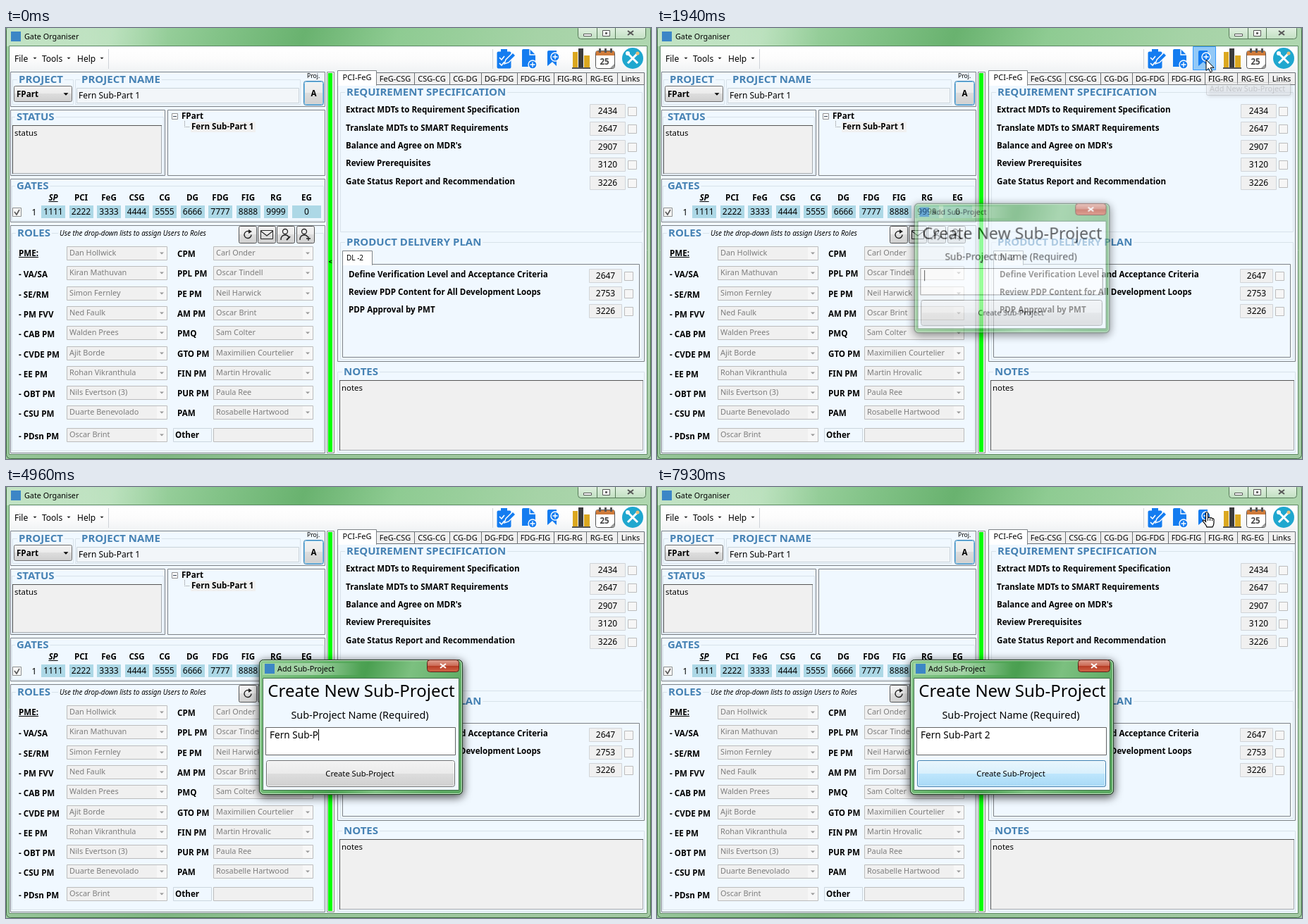
Recreate the animation shown at these times as an HTML page with a canvas. Size 915 px wide and 612 px high, loop 8 s.

```html
<!DOCTYPE html>
<html lang="en">
<head>
<meta charset="utf-8">
<title>Gate Organiser</title>
<style>
html, body { margin: 0; width: 100%; height: 100%; overflow: hidden; }
canvas { display: block; }
</style>
</head>
<body>
<canvas id="stage" width="915" height="612"></canvas>
<script>
const LOOP = 8000;
const stage = document.getElementById('stage').getContext('2d');
const dialogLayer = Object.assign(document.createElement('canvas'), { width: 915, height: 612 });
const dialogCtx = dialogLayer.getContext('2d');
let c = stage; // context currently drawn to

const BLUE = '#4682b4', ALICE = '#f0f8ff', FACE = '#f0f0f0', ICON = '#147cf0';
const clamp = v => Math.max(0, Math.min(1, v));
const ramp = (t, from, to) => clamp((t - from) / (to - from));

// ---- drawing helpers ----
function text(str, x, y, { size = 12, bold, italic, color = '#000', align = 'left', line } = {}) {
  c.font = `${italic ? 'italic ' : ''}${bold ? 'bold ' : ''}${size}px "Noto Sans", sans-serif`;
  c.fillStyle = color;
  c.textAlign = align;
  c.fillText(str, x, y + size * 0.36);
  const width = c.measureText(str).width;
  if (line) c.fillRect(align === 'center' ? x - width / 2 : x, Math.round(y + size * 0.36) + 1, width, 1);
  return width;
}
const label = (str, x, y, opts) => text(str, x, y, { size: 11.6, bold: true, ...opts });

function box(x0, y0, x1, y1, fill, stroke, r = 0) {
  c.beginPath();
  c.roundRect(x0 + 0.5, y0 + 0.5, x1 - x0 - 1, y1 - y0 - 1, r);
  if (fill) { c.fillStyle = fill; c.fill(); }
  if (stroke) { c.strokeStyle = stroke; c.lineWidth = 1; c.stroke(); }
}
function rect(x, y, w, h, fill) { c.fillStyle = fill; c.fillRect(x, y, w, h); }
function shape(d, fill, stroke, width = 1) {
  const p = new Path2D(d);
  if (fill) { c.fillStyle = fill; c.fill(p); }
  if (stroke) { c.strokeStyle = stroke; c.lineWidth = width; c.stroke(p); }
}
function disc(x, y, r, fill, stroke, width = 1) {
  shape(`M${x - r} ${y}a${r} ${r} 0 1 0 ${2 * r} 0a${r} ${r} 0 1 0 ${-2 * r} 0z`, fill, stroke, width);
}
function gradient(x0, y0, x1, y1, ...stops) {
  const g = c.createLinearGradient(x0, y0, x1, y1);
  stops.forEach((s, i) => g.addColorStop(...(Array.isArray(s) ? s : [i / (stops.length - 1), s])));
  return g;
}
const glossy = (y0, y1, a, b, d, e) => gradient(0, y0, 0, y1, [0, a], [0.49, b], [0.5, d], [1, e]);
const plainButton = (y0, y1) => glossy(y0, y1, '#f3f3f3', '#ebebeb', '#dddddd', '#cfcfcf');
const arrow = (x, y, color, w = 3) => shape(`M${x - w} ${y - w / 2}h${2 * w}l${-w} ${w}z`, color);
function faded(alpha, draw) {
  if (alpha <= 0) return;
  c.save();
  c.globalAlpha *= alpha;
  draw();
  c.restore();
}
function group(title, x, y, x0, x1, bottom) {
  box(x0, y, x1, bottom, null, '#d8e2ea');
  c.font = 'bold 15px "Noto Sans", sans-serif';
  rect(x - 2, y - 6, c.measureText(title).width + 4, 12, ALICE);
  text(title, x, y, { size: 15, bold: true, color: BLUE });
}
function checkbox(x, y, checked) {
  box(x, y, x + 13, y + 13, '#f6f6f6', checked ? '#8e8f8f' : '#bcbcbc');
  if (checked) shape(`M${x + 3} ${y + 6}l3 4l4 -7`, null, '#555', 1.6);
}
const cross = (x, y, color) => shape(`M${x - 4} ${y - 3}l8 6m0 -6l-8 6`, null, color, 2);

// ---- window frame ----
function frame(active) {
  rect(0, 0, 915, 612, gradient(0, 0, 915, 300, [0, '#8fcb94'], [0.15, '#a9d9ac'], [0.3, '#83c388'],
    [0.42, '#69b26f'], [0.55, '#8ecb92'], [0.75, '#a6d3a7'], [1, '#b4d8b4']));
  faded(0.55, () => rect(0, 26, 915, 586, gradient(0, 26, 0, 612, '#a9d5aa', '#c3dfc2', '#93bd94')));
  faded(active, () => {
    rect(0, 0, 915, 612, gradient(0, 0, 915, 300, [0, '#54bd50'], [0.2, '#3fae3b'], [0.45, '#2a9c28'],
      [0.7, '#31a32e'], [1, '#228c22']));
    faded(0.5, () => rect(0, 60, 6, 100, gradient(0, 60, 0, 160, '#8fda8c', '#c2ecc0', '#3fae3b')));
  });
  faded(0.45, () => rect(0, 0, 230, 26, gradient(0, 0, 230, 0, '#fff', '#ffffffb0', '#fff0')));
  box(0, -4, 915, 612, null, '#3d6b40', 6);
  rect(7, 5, 14, 14, '#3c86c6');
  text('Gate Organiser', 26, 12, { size: 10.8 });

  box(811, -4, 908, 16, gradient(0, 0, 0, 16, '#ffffffa0', '#ffffff40'), '#567a58', 4);
  faded(active, () => box(864, -4, 908, 16, glossy(0, 16, '#e0a598', '#cf6a55', '#b93a22', '#d4664a'), '#5a2018', 4));
  rect(838, 0, 1, 15, '#567a58');
  rect(864, 0, 1, 15, '#567a58');
  box(819, 8, 831, 12, '#fff', '#555');
  box(846, 3, 857, 12, '#fff', '#555');
  rect(850, 6, 3, 3, '#666');
  cross(886, 7, active > 0.5 ? '#fff' : '#555');

  box(4, 25, 910, 606, ALICE, '#5f8a61');
}

// ---- toolbar ----
function toolbar(hover) {
  rect(6, 27, 902, 34, gradient(0, 27, 0, 61, '#ffffff', '#fcfcfc', '#f1f3f5'));
  [['File', 12, 41], ['Tools', 51, 89], ['Help', 101, 136]].forEach(([s, x, ax]) => {
    text(s, x, 44);
    arrow(ax, 43, '#222', 2.5);
  });
  rect(145, 30, 1, 28, '#cfd3d8');
  rect(690, 30, 1, 28, '#cfd3d8');
  if (hover) box(760, 26, 793, 60, '#93c9f7', '#3399ff');

  // edit
  box(696, 33, 717, 58, ICON, null, 2);
  rect(702, 30, 9, 5, ICON);
  shape('M700 42l3 3l4 -5M700 50l3 3l4 -5', null, '#fff', 1.6);
  shape('M707 51l2 -6l10 -10l4 4l-10 10z', ICON, '#fff', 1.4);
  // new document
  shape('M732 32q0 -2 2 -2h9l8 8v17h-19z', ICON);
  shape('M743 30v8h8', null, '#fff', 1.3);
  disc(747, 52, 6, ICON, '#fff', 1.4);
  shape('M743.5 52h7M747 48.5v7', null, '#fff', 1.4);
  // bookmark
  shape('M768 34q0 -2 2 -2h11v22l-6 -6l-7 6z', ICON);
  disc(779, 41, 6, ICON, '#fff', 1.4);
  shape('M775.5 41h7M779 37.5v7', null, '#fff', 1.4);
  // chart
  rect(804, 34, 7, 23, '#dba820');
  rect(812, 29, 7, 28, '#3c3c3c');
  rect(820, 39, 8, 18, '#dba820');
  rect(803, 56, 26, 2, '#555');
  // calendar
  box(836, 32, 864, 58, '#fff', '#555', 3);
  rect(837, 33, 26, 6, '#cf7b3a');
  [842, 850, 858].forEach(x => rect(x - 1, 29, 3, 6, '#555'));
  text('25', 849, 48, { size: 11.5, bold: true, align: 'center', color: '#444' });
  shape('M857 57l6 -6v6z', '#999');
  // tools
  disc(889, 43, 15, '#1fa7cf');
  shape('M882 36l14 14M896 36l-14 14', null, '#fff', 3);
  disc(882, 36, 3, '#fff');
  disc(896, 36, 2.5, '#e8c07a');
}

// ---- left side ----
const STAFF = [
  ['PME:', 'Dan Hollwick', 'CPM', 'Carl Onder'],
  ['- VA/SA', 'Kiran Mathuvan', 'PPL PM', 'Oscar Tindell'],
  ['- SE/RM', 'Simon Fernley', 'PE PM', 'Neil Harwick'],
  ['- PM FVV', 'Ned Faulk', 'AM PM', 'Oscar Brint'],
  ['- CAB PM', 'Walden Prees', 'PMQ', 'Sam Colter'],
  ['- CVDE PM', 'Ajit Borde', 'GTO PM', 'Maximilien Courtelier'],
  ['- EE PM', 'Rohan Vikranthula', 'FIN PM', 'Martin Hrovalic'],
  ['- OBT PM', 'Nils Evertson (3)', 'PUR PM', 'Paula Ree'],
  ['- CSU PM', 'Duarte Benevolado', 'PAM', 'Rosabelle Hartwood'],
  ['- PDsn PM', 'Oscar Brint', 'Other', null],
];
const GATES = ['SP', 'PCI', 'FeG', 'CSG', 'CG', 'DG', 'FDG', 'FIG', 'RG', 'EG'];

function combo(x0, x1, y, value) {
  box(x0, y - 10, x1, y + 10, FACE, '#bcbcbc');
  if (value === null) return;
  text(value, x0 + 4, y - 0.5, { size: 10.9, color: '#7c7c7c' });
  rect(x1 - 15, y - 9, 14, 18, '#f7f7f7');
  arrow(x1 - 8, y, '#9a9a9a');
}

function leftSide(refreshed, active) {
  const panel = (y0, y1, x0 = 6, x1 = 453) => box(x0, y0, x1, y1, ALICE, '#7d8286');
  panel(62, 112);
  group('PROJECT', 18, 73, 9, 96, 109);
  group('PROJECT NAME', 107, 73, 98, 418, 109);
  box(11, 82, 94, 105, plainButton(82, 105), '#707070', 2);
  label('FPart', 15, 94);
  arrow(85, 94, '#000', 3.5);
  box(100, 85, 416, 107, '#f2f6f9', '#c9d3da');
  text('Fern Sub-Part 1', 103, 96);
  text('Proj.', 427, 68, { size: 8.6 });
  box(422, 75, 451, 110, plainButton(75, 110), active > 0.5 ? '#1f5f93' : '#3c7fb1', 3);
  box(423, 76, 450, 109, null, '#7cc4ec', 2);
  label('A', 436.5, 93, { align: 'center' });

  panel(116, 210, 6, 226);
  group('STATUS', 15, 126, 8, 224, 209);
  box(9, 138, 221, 207, FACE, '#a5a9ad');
  rect(9, 138, 212, 1, '#555');
  rect(9, 138, 1, 69, '#555');
  text('status', 12, 149, { size: 11.4 });

  panel(116, 210, 229, 453);
  if (!refreshed) {
    box(235, 121, 244, 130, '#fff', '#919191');
    rect(237, 125, 5, 1, '#345');
    label('FPart', 249, 125);
    c.setLineDash([1, 1]);
    shape('M253.5 132v8.500h7', null, '#888');
    c.setLineDash([]);
    rect(262, 133, 92, 15, FACE);
    label('Fern Sub-Part 1', 263, 140);
  }

  panel(214, 276);
  group('GATES', 15, 224, 8, 451, 274);
  checkbox(9, 255, true);
  text('1', 40, 262, { align: 'center' });
  GATES.forEach((name, i) => {
    const x = i < 9 ? 67 + i * 39.5 : 426.5, half = i < 9 ? 17 : 20.5;
    label(name, x, 241, { align: 'center', italic: !i, line: !i });
    rect(Math.round(x - half), 252, half * 2, 18, '#add8e6');
    text(i < 9 ? String(i + 1).repeat(4) : '0', x, 261, { align: 'center' });
  });

  panel(280, 604);
  group('ROLES', 16, 291, 8, 451, 601);
  rect(74, 284, 380 - 4 - 74, 14, ALICE);
  text('Use the drop-down lists to assign Users to Roles', 76, 291, { size: 9.9, italic: true });
  [330, 357, 384, 412].forEach(x => box(x, 281, x + 26, 306, plainButton(281, 306), '#555', 2));
  shape('M346 289.500a5 5 0 1 0 2 4', null, '#222', 1.4);
  shape('M344 286l5 3l-5 3z', '#222');
  box(361, 287, 379, 300, null, '#222');
  shape('M361 288l9 7l9 -7', null, '#222', 1.2);
  [396, 423].forEach(x => {
    disc(x, 289, 3.5, null, '#222', 1.3);
    shape(`M${x - 6} 301q0 -7 6 -7q4 0 5 3`, null, '#222', 1.3);
  });
  shape('M398 301l5 -5', null, '#222', 2);
  shape('M426 299h6m-3 -3v6', null, '#222', 1.3);

  STAFF.forEach(([roleA, nameA, roleB, nameB], i) => {
    const y = i < 9 ? Math.round(320 + i * 28.3) : 578;
    if (nameB === null) box(237, y - 10, 292, y + 10, ALICE, '#ccd6de');
    label(roleA, 18, i ? y + 2 : y, { line: !i });
    label(roleB, nameB === null ? 240 : 243, nameB === null ? y : y + 1);
    combo(86, 229, y, nameA);
    combo(294, 436, y, refreshed && roleB === 'AM PM' ? 'Tim Dorsal' : nameB);
  });

  rect(455, 62, 12, 542, '#f4f4f4');
  box(455, 62, 466, 604, '#e9efe9', '#8a8f8a');
  rect(457, 64, 6, 538, '#00ff00');
  text('<', 460, 332, { size: 9, bold: true, align: 'center' });
}

// ---- right side ----
function tasks(names, values, x, y0, boxX, boxW) {
  names.forEach((name, i) => {
    const y = y0 + i * 25.4, mid = Math.round(y + 2);
    label(name, x, y);
    box(boxX, mid - 10, boxX + boxW, mid + 10, FACE, '#d0d4d8');
    text(values[i], boxX + boxW / 2, mid, { align: 'center' });
    checkbox(boxX + boxW + 3, mid - 6);
  });
}

function rightSide() {
  box(470, 80, 906, 474, ALICE, '#7d8286');
  const edges = [525, 579, 629, 674, 725, 777, 823, 867, 905];
  ['FeG-CSG', 'CSG-CG', 'CG-DG', 'DG-FDG', 'FDG-FIG', 'FIG-RG', 'RG-EG', 'Links'].forEach((name, i) => {
    box(edges[i], 63, edges[i + 1] + 1, 81, FACE, '#6b6f73');
    text(name, (edges[i] + edges[i + 1]) / 2, 72, { size: 11, align: 'center' });
  });
  box(470, 60, 526, 82, '#fff', '#7d8286');
  rect(471, 80, 54, 2, '#fff');
  text('PCI-FeG', 498, 70, { size: 11, align: 'center' });

  group('REQUIREMENT SPECIFICATION', 483, 91, 474, 903, 290);
  tasks(['Extract MDTs to Requirement Specification', 'Translate MDTs to SMART Requirements',
    'Balance and Agree on MDR\'s', 'Review Prerequisites', 'Gate Status Report and Recommendation'],
    [2434, 2647, 2907, 3120, 3226], 482, 116, 828, 51);

  group('PRODUCT DELIVERY PLAN', 483, 304, 474, 903, 471);
  box(477, 335, 899, 468, ALICE, '#7d8286');
  box(477, 316, 520, 337, '#fff', '#7d8286');
  rect(478, 335, 41, 2, '#fff');
  text('DL -2', 483, 326, { size: 10 });
  tasks(['Define Verification Level and Acceptance Criteria', 'Review PDP Content for All Development Loops',
    'PDP Approval by PMT'], [2647, 2753, 3226], 486, 349.5, 827, 47);

  group('NOTES', 479, 488, 470, 906, 603);
  box(473, 500, 904, 600, FACE, '#a5a9ad');
  rect(473, 500, 431, 1, '#555');
  rect(473, 500, 1, 100, '#555');
  text('notes', 476, 511, { size: 11.4 });
}

// ---- dialog ----
const TYPED = 'Fern Sub-Part 2';
const KEY_TIMES = [3250, 3330, 3400, 3480, 3710, 4170, 4320, 4490, 4640, 4960, 5580, 5660, 5740, 5890, 6060];
const caretOn = t => t < 2470 || (t >= 2870 && t < 5500) || (t >= 5580 && t < 6520);

function dialog(t) {
  c.clearRect(0, 0, 915, 612);
  c.save();
  c.shadowColor = 'rgba(0,0,0,.75)';
  c.shadowBlur = 13;
  c.shadowOffsetY = 3;
  box(359, 245, 648, 437, '#69b36d', '#1e3a20', 6);
  c.restore();
  box(359, 245, 648, 437, gradient(359, 245, 648, 330, [0, '#8ecb91'], [0.3, '#5fb064'], [0.5, '#4a9f50'],
    [0.7, '#7cc080'], [1, '#5aa860']), '#1e3a20', 6);
  box(360, 246, 647, 436, null, '#c4e6c5', 5);
  faded(0.4, () => rect(364, 250, 140, 17, gradient(364, 0, 504, 0, '#fff8', '#fff', '#fff0')));
  rect(367, 251, 14, 14, '#3c86c6');
  text('Add Sub-Project', 385, 258, { size: 10.8 });
  box(597, 245, 643, 263, glossy(245, 263, '#dfa394', '#cc6a55', '#b53a22', '#d4694c'), '#5a2018', 4);
  cross(620, 254, '#fff');
  box(364, 271, 643, 431, ALICE, '#41704a');
  text('Create New Sub-Project', 504, 289, { size: 24, align: 'center' });
  text('Sub-Project Name (Required)', 502, 324, { size: 14.4, align: 'center' });

  box(368, 341, 638, 381, '#fff', '#646464');
  const width = text(TYPED.slice(0, KEY_TIMES.filter(k => k <= t).length), 374, 352, { size: 13.6 });
  if (caretOn(t)) rect(Math.round(374 + width), 344, 1, 16, '#000');

  box(369, 388, 637, 426, plainButton(388, 426), '#707070', 3);
  const hover = Math.max(ramp(t, 6680, 6900), 0.5 * clamp(1 - Math.abs(t - 2570) / 130));
  faded(hover, () => box(369, 388, 637, 426, glossy(388, 426, '#eaf6fd', '#d9f0fc', '#bee6fd', '#a7d9f5'), '#3c7fb1', 3));
  if (t >= 6980 && t < 7150)
    box(369, 388, 637, 426, glossy(388, 426, '#dceefa', '#bfe0f4', '#9bcfee', '#74b8e0'), '#2c628b', 3);
  else box(370, 389, 636, 425, null, '#ffffffa0', 2);
  text('Create Sub-Project', 502, 407, { size: 11.2, align: 'center' });
}

function showDialog(t) {
  const p = ramp(t, 1790, 2040);
  if (!p) return;
  c = dialogCtx;
  dialog(t);
  c = stage;
  faded(p, () => {
    const s = 0.9 + 0.1 * p;
    c.translate(503.5, 340);
    c.scale(s, s);
    c.drawImage(dialogLayer, -503.5, -340);
  });
}

// ---- pointer ----
const POINTER_PATH = [[380, 915, 130], [600, 850, 90], [910, 779, 45], [2060, 779, 45], [2470, 540, 421],
  [2560, 500, 398], [2700, 462, 357], [6520, 462, 357], [6900, 440, 414], [7370, 440, 414],
  [7600, 640, 240], [7850, 790, 60], [7930, 780, 36], [LOOP, 780, 36]];

function pointerAt(t) {
  const i = POINTER_PATH.findIndex(p => p[0] > t);
  const [t0, x0, y0] = POINTER_PATH[i - 1], [t1, x1, y1] = POINTER_PATH[i];
  const k = ramp(t, t0, t1);
  return [x0 + (x1 - x0) * k, y0 + (y1 - y0) * k];
}

function pointer(t) {
  if (t < 380 || (t >= 3250 && t < 6520)) return;
  const [x, y] = pointerAt(t).map(Math.round);
  const inDialog = t > 2100 && x > 365 && x < 640;
  c.save();
  c.translate(x, y);
  if (inDialog && y > 341 && y < 381) {
    shape('M-3 -6.500h2.500l.5 1l.5 -1h2.500M-3 6.500h2.500l.5 -1l.5 1h2.500M0 -6v12', null, '#000', 1.2);
  } else if (t >= 6520 || (inDialog && y >= 388 && y <= 426)) {
    shape('M-1.500 1.500q0 -2 1.500 -2t1.500 2v6q2 -1 3 .5q2 -.8 3 .8q2.500 -.5 2.500 2v4q0 3 -2 6h-8' +
      'q-1 -3 -5.500 -8q-.5 -2.500 2 -1.500l2 2z', '#fff', '#000', 1.2);
    shape('M1.500 8v4M4.500 9v3M7.500 10v2', null, '#000');
  } else {
    shape('M0 0v15.500l3.500 -3.300l2.500 5.600l2.600 -1.200l-2.500 -5.300h4.900z', '#fff', '#000');
  }
  c.restore();
}

function tooltip(alpha) {
  faded(alpha, () => {
    c.save();
    c.shadowColor = 'rgba(0,0,0,.5)';
    c.shadowBlur = 4;
    c.shadowOffsetX = c.shadowOffsetY = 2;
    box(779, 77, 899, 96, '#fff', null, 2);
    c.restore();
    box(779, 77, 899, 96, gradient(0, 77, 0, 96, '#ffffff', '#e4e5f0'), '#767676', 2);
    text('Add New Sub-Project', 784, 86, { size: 10.9, color: '#575757' });
  });
}

function render(t) {
  const active = t < 1790 ? ramp(t, 360, 500) : 0;
  frame(active);
  toolbar(t >= 870 && t < 2100);
  leftSide(t >= 7700, active);
  rightSide();
  tooltip(t < 1790 ? ramp(t, 1160, 1370) : 1 - ramp(t, 1770, 1990));
  showDialog(t);
  pointer(t);
}

const start = performance.now();
(function tick() {
  render((performance.now() - start) % LOOP);
  requestAnimationFrame(tick);
})();
</script>
</body>
</html>
```
